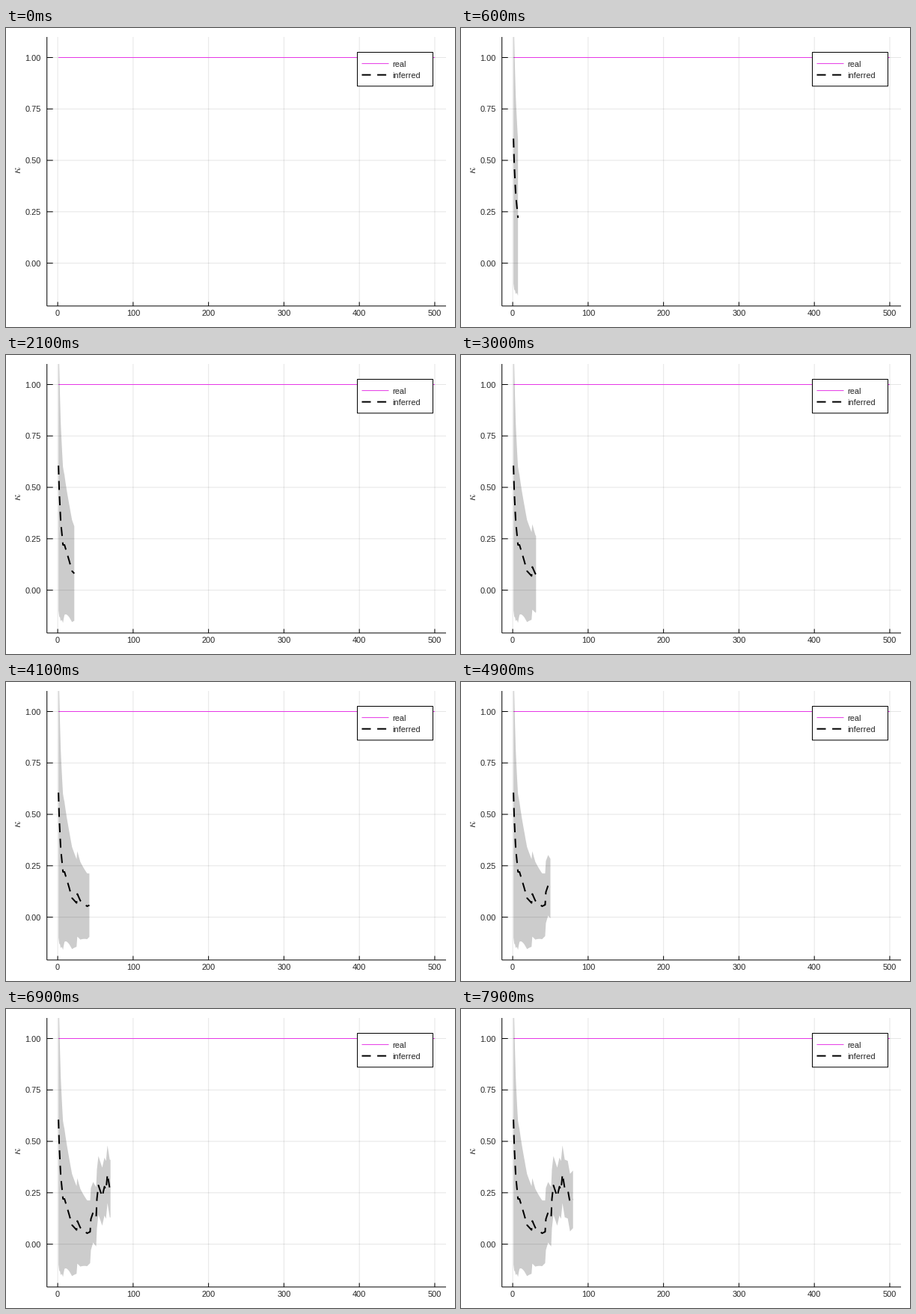
A matplotlib script for the animation above (8 s loop, 600 px wide and 400 px high).

```python
import numpy as np
import matplotlib.pyplot as plt
from matplotlib.animation import FuncAnimation
from matplotlib.patches import Polygon, Rectangle

W, H, DPI = 600, 400, 100
PX = 72 / DPI
LEFT, RIGHT, TOP, BOTTOM = 54.7, 588, 12, 371.9
STEPS = 80
INK, MAGENTA = "#262626", "#e636e6"
DASH = (0, (6, 4.3))

plt.rcParams["font.family"] = "Liberation Sans"
plt.rcParams["mathtext.fontset"] = "cm"
plt.rcParams["path.snap"] = False

# Turning points of the inferred mean: (step, value)
TURNS = [(1, .606), (2, .482), (4, .333), (7, .22), (9, .22), (15, .146),
         (19, .093), (25, .069), (26, .113), (30, .08), (39, .053),
         (43, .06), (44, .122), (47, .155), (51, .133), (52, .22),
         (54, .286), (59, .231), (62, .28), (64, .264), (66, .34),
         (69, .271), (73, .265), (76, .202), (80, .218)]

step = np.arange(1, STEPS + 1)
mean = np.interp(step, *zip(*TURNS))
# Uncertainty shrinks quickly at first, then levels off
half = (.14 + .395 * np.exp(-(step - 1) / 3.7)
        + .17 * np.exp(-((step - 1) / 26) ** 2))


def sx(x):
    return 69.1 + 1.0077 * np.asarray(x)


def sy(y):
    return 314.6 - 275.1 * np.asarray(y)


fig = plt.figure(figsize=(W / DPI, H / DPI), dpi=DPI, facecolor="white")
ax = fig.add_axes([0, 0, 1, 1])
ax.set_xlim(0, W)
ax.set_ylim(H, 0)
ax.axis("off")


def line(xs, ys, color="black", width=1, **kw):
    return ax.plot(xs, ys, color=color, lw=width * PX,
                   solid_capstyle="butt", dash_capstyle="butt", **kw)[0]


def label(x, y, text, ha="left"):
    ax.text(x, y, text, fontsize=11 * PX, color=INK, ha=ha, va="baseline",
            zorder=8)


# Grid, ticks and axes
for v in range(0, 501, 100):
    x = sx(v)
    line([x, x], [TOP, BOTTOM], alpha=.1, zorder=1)
    line([x, x], [BOTTOM - 5.4, BOTTOM], zorder=5)
    label(x, 385, str(v), "center")
for v in np.linspace(0, 1, 5):
    y = sy(v)
    line([LEFT, RIGHT], [y, y], alpha=.1, zorder=1)
    line([LEFT, LEFT + 8], [y, y], zorder=5)
    label(47, y + 4, f"{v:.2f}", "right")
line([LEFT, LEFT], [TOP, BOTTOM], zorder=5)
line([LEFT, RIGHT], [BOTTOM, BOTTOM], zorder=5)
ax.text(16, 190, r"$\kappa$", fontsize=15 * PX, color=INK, rotation=90,
        ha="center", va="center")

# Series
line(sx([1, 500]), sy([1, 1]), MAGENTA, zorder=2)
ribbon = Polygon(np.zeros((3, 2)), fc="black", alpha=.2, lw=0, zorder=3)
ax.add_patch(ribbon)
ribbon.set_clip_path(Rectangle((LEFT, TOP), RIGHT - LEFT, BOTTOM - TOP,
                               transform=ax.transData))
curve = line([], [], width=2, ls=DASH, zorder=4)

# Legend
ax.add_patch(Rectangle((469.5, 32.5), 101, 45.3, fc="white", ec="black",
                       lw=PX, zorder=6))
line([475.5, 511.5], [47.6, 47.6], MAGENTA, zorder=7)
line([475.5, 511.5], [62.7, 62.7], width=2, ls=DASH, zorder=7)
label(516, 52, "real")
label(516, 67, "inferred")


def update(i):
    n = i + 1
    x, m, h = sx(step[:n]), mean[:n], half[:n]
    upper = np.column_stack([x, sy(m + h)])
    lower = np.column_stack([x, sy(m - h)])
    ribbon.set_xy(np.vstack([upper, lower[::-1]]))
    curve.set_data(x, sy(m))
    for part in (ribbon, curve):
        part.set_visible(n > 1)
    return ribbon, curve


anim = FuncAnimation(fig, update, frames=STEPS, interval=100,
                     repeat=True, repeat_delay=0)
plt.show()
```
